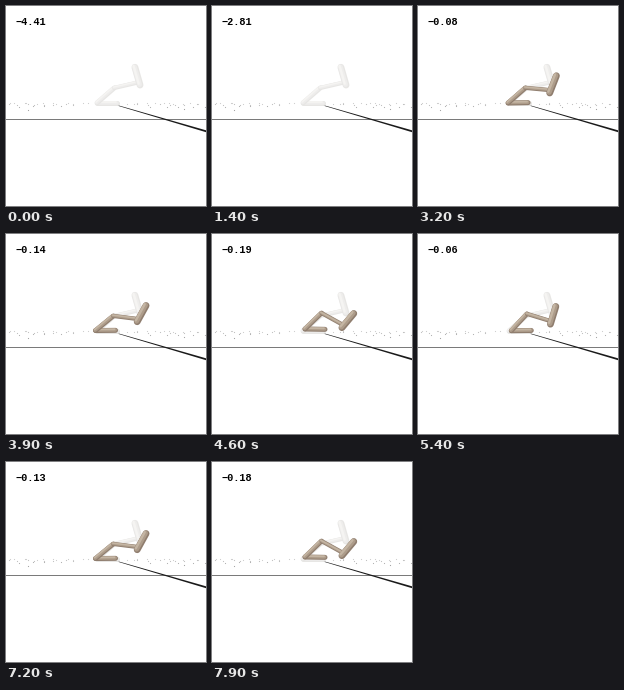
A matplotlib script for the animation above (8 s loop, 200x200 px).

```python
import numpy as np
import matplotlib.pyplot as plt
from matplotlib.animation import FuncAnimation

SIZE, DPI, FRAMES, STEP = 200, 100, 80, 100
PX = 72 / DPI
TAN = ((0.56, 0.49, 0.43), (0.68, 0.61, 0.54), (0.77, 0.71, 0.64))
PALE = ((0.905, 0.9, 0.895), (0.935, 0.93, 0.925), (0.96, 0.955, 0.95))
WIDTHS = (5, 4.8, 4.2, 6.8)     # foot, shin, thigh, torso

# ankle x, ankle y, then foot, shin, thigh and torso angles (degrees, y down)
GOAL = np.array((91, 97, 0, -41, -13, -106))
STAND = np.array((91, 97, -1, -43, 8, -71))
CROUCH = np.array((93, 95, 1, -44, 29, -50))
ROCK = np.array((2, 0, 0, -4, 6, -5))
AIRBORNE = np.array((63, -57, 92, 39))

LAND, LOW, CYCLE = 32, 46, 33   # in frames
SCORE_T = (0, 2, 3, 24, 32, 46, 54, 64, 79)
SCORE = (4.41, 4.43, 4.43, 1.33, 0.08, 0.19, 0.06, 0.07, 0.18)


def pose_at(t):
    """Fly in from the upper right, then sway between standing and crouching."""
    phase = 2 * np.pi * (t - LOW) / CYCLE
    crouch = ((1 + np.cos(phase)) / 2) ** 3
    pose = STAND + (CROUCH - STAND) * crouch + ROCK * np.sin(phase)
    left = max(LAND - t, 0) / 8
    pose[0] += 64 * left
    pose[1] -= 21 * left ** 2.2
    u = min(left, 1)
    pose[2:] += (AIRBORNE - pose[2:]) * u * u * (3 - 2 * u)
    return pose


def segments(pose):
    """End points of foot, shin, thigh and torso."""
    ankle = pose[:2]
    angles = np.radians(pose[2:])
    foot, shin, thigh, torso = np.column_stack((np.cos(angles), np.sin(angles)))
    knee = ankle + 23 * shin
    hip = knee + 25.5 * thigh
    return ((ankle, ankle + 20 * foot), (ankle, knee), (knee, hip),
            (hip - 3 * torso, hip + 15.5 * torso))


def make_body(colors, z):
    return [[ax.plot([], [], color=c, lw=w * k * PX, solid_capstyle="round", zorder=z)[0]
             for c, k in zip(colors, (1, 0.72, 0.36))]
            for w in WIDTHS]


def place(body, pose):
    for strokes, ends, w in zip(body, segments(pose), WIDTHS):
        for line, shift in zip(strokes, (0, 0.08, 0.2)):
            line.set_data(*(np.array(ends) - shift * w).T)


fig = plt.figure(figsize=(SIZE / DPI, SIZE / DPI), dpi=DPI, facecolor="white")
ax = fig.add_axes((0, 0, 1, 1))
ax.set(xlim=(0, SIZE), ylim=(SIZE, 0))
ax.axis("off")

# floor specks, sparser and darker further below the horizon
rng = np.random.default_rng(4)
for row in range(4):
    x = np.linspace(1, 199, 28 - 6 * row) + rng.uniform(-3, 3, 28 - 6 * row)
    x = x[np.abs(x - 100) > 14 + 15 * row]
    y = 97.3 + row + 0.35 * row ** 2 + rng.uniform(-0.6, 0.6, x.size)
    ax.scatter(x, y, s=0.7, color=str(0.8 - 0.06 * row), lw=0, zorder=1)

ax.fill([0, SIZE, SIZE, 0], [113, 113, 114, 114], color="0.48", lw=0, zorder=1)
ax.fill([110, SIZE, SIZE, 110], [98.7, 124.3, 126.2, 99.2], color="0.1", lw=0, zorder=1)

place(make_body(PALE, 2), GOAL)
hopper = make_body(TAN, 3)
label = ax.text(9.3, 19.2, "", family="Liberation Mono", weight="bold",
                size=10.3 * PX, color="black", va="baseline", zorder=5)


def draw(frame):
    label.set_text(f"\u2212{np.interp(frame, SCORE_T, SCORE):.2f}")
    place(hopper, pose_at(frame))
    return [label]


anim = FuncAnimation(fig, draw, frames=FRAMES, interval=STEP, repeat=True, repeat_delay=0)
plt.show()
```
